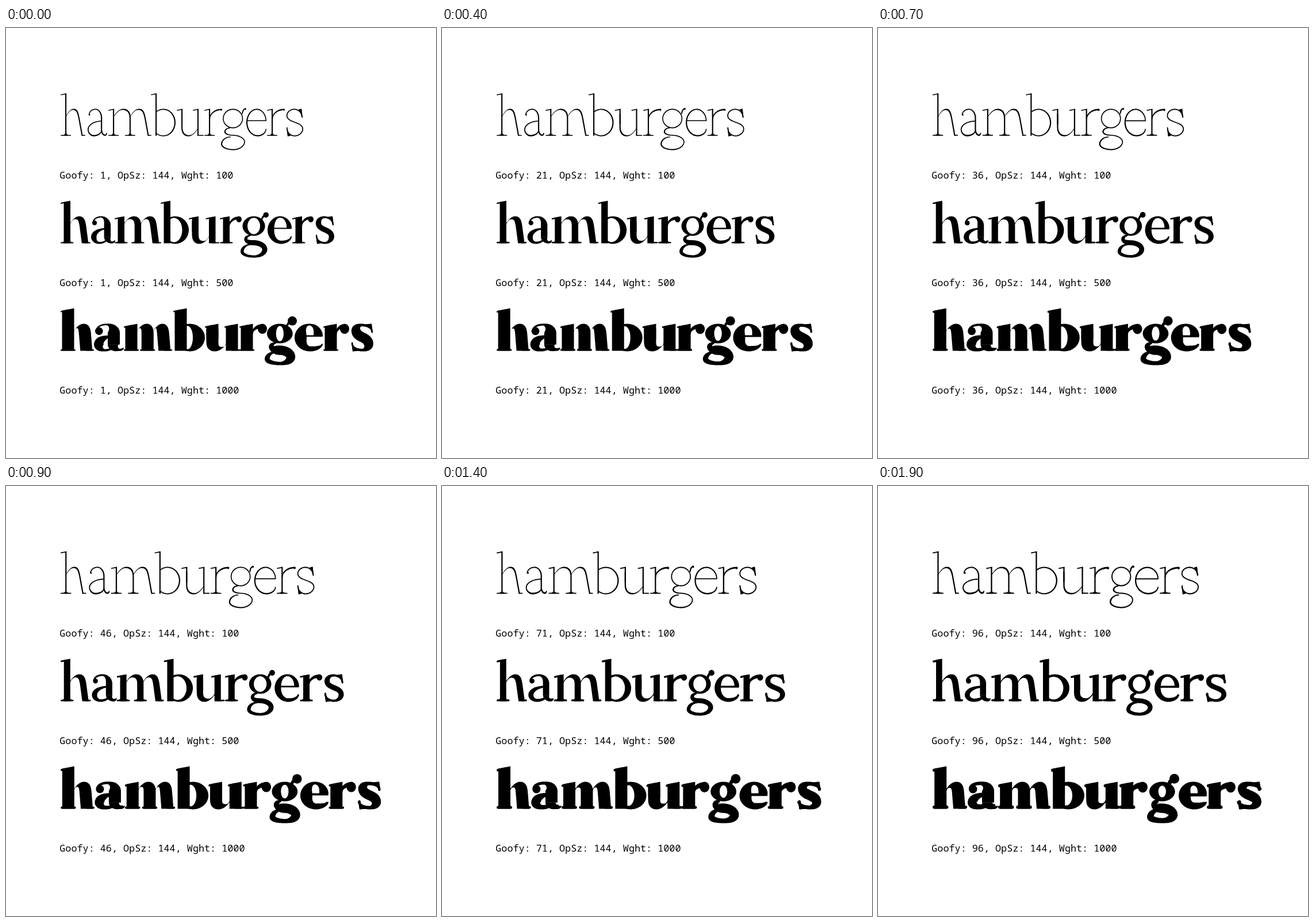
Write an HTML page with a canvas that moves like this. It is 748 px wide and 748 px high and loops after 2000 ms.

```html
<!DOCTYPE html>
<html lang="en">
<head>
<meta charset="utf-8">
<title>Variable type specimen</title>
<style>
  html, body { margin: 0; width: 100%; height: 100%; overflow: hidden; background: #fff; }
  canvas, svg { position: absolute; left: 0; top: 0; width: 748px; height: 748px; }
  text { font: 500 16.8px "Noto Sans Mono", "DejaVu Sans Mono", monospace; fill: #000; white-space: pre; }
</style>
</head>
<body>
<canvas role="img" aria-label="hamburgers"></canvas>
<svg viewBox="0 0 748 748"></svg>
<script>
const WORD = 'hamburgers', STEP = 100, STEPS = 20, ROW = 187;
const XH = -47, ASC = -74;

// Each pair holds the value at the low and the high end of the Goofy axis.
const ROWS = [
  { weight: 100, stem: [2.1, 2.3], hair: [1.5, 1.9], over: [8, 8.3], ball: [3, 4.2],
    left: [[95, 142, 178, 252, 297, 345, 374, 418, 454, 487], [95, 147, 188, 266, 314, 368, 403, 447, 490, 527]],
    width: [[43, 34, 75, 43, 47, 31, 44, 35, 31, 30], [46, 38, 78, 46, 52, 34, 43, 41, 35, 31]] },
  { weight: 500, stem: [11.5, 10.6], hair: [2.1, 3.6], over: [5.5, 6], ball: [9.5, 10.5],
    left: [[95, 148, 189, 269, 318, 372, 408, 455, 498, 538], [95, 151, 197, 281, 335, 391, 432, 481, 526, 570]],
    width: [[52, 42, 81, 49, 53, 38, 49, 42, 37, 33], [53, 45, 83, 52, 56, 41, 48, 43, 41, 36]] },
  { weight: 1000, stem: [21, 21], hair: [2.4, 5.5], over: [2.5, 3.2], ball: [16, 17],
    left: [[95, 153, 205, 291, 346, 406, 450, 502, 552, 600], [95, 156, 209, 301, 359, 420, 468, 523, 572, 625]],
    width: [[58, 52, 84, 55, 61, 48, 56, 49, 45, 39], [60, 53, 91, 58, 62, 49, 56, 49, 50, 42]] }
];

const canvas = document.querySelector('canvas');
const ctx = canvas.getContext('2d');
const dpr = window.devicePixelRatio || 1;
canvas.width = canvas.height = 748 * dpr;
ctx.lineCap = 'round';

const svg = document.querySelector('svg');
const labels = ROWS.map((row, i) => {
  const label = document.createElementNS(svg.namespaceURI, 'text');
  label.setAttribute('x', 93.3);
  label.setAttribute('y', 262 + i * ROW);
  return svg.appendChild(label);
});

let w, t, o, b;   // stem, hairline, serif overhang, ball size

const mix = (a, c, k) => a + (c - a) * k;

function shape(build, rule = 'nonzero') {
  ctx.beginPath();
  build();
  ctx.fill(rule);
}

function poly(...pts) {
  shape(() => pts.forEach(p => ctx.lineTo(...p)));
}

function bar(x1, y1, x2, y2, size = t) {
  ctx.lineWidth = size;
  ctx.beginPath();
  ctx.moveTo(x1, y1);
  ctx.lineTo(x2, y2);
  ctx.stroke();
}

function oval(x, y, rx, ry) {
  shape(() => ctx.ellipse(x, y, rx, ry, 0, 0, 7));
}

// Ring with thick sides and thin top and bottom.
function ring(x1, x2, y1, y2, inner1, inner2) {
  const cy = (y1 + y2) / 2, ry = (y2 - y1) / 2;
  shape(() => {
    ctx.ellipse((x1 + x2) / 2, cy, (x2 - x1) / 2, ry, 0, 0, 2 * Math.PI);
    ctx.closePath();
    ctx.moveTo(inner2, cy);
    ctx.ellipse((inner1 + inner2) / 2, cy, (inner2 - inner1) / 2, ry - t - .06 * w, 0, 0, 2 * Math.PI);
  }, 'evenodd');
}

// Swelling stroke through [x, y, width]; dirs gives each point's tangent.
function pen(dirs, ...pts) {
  const near = [], far = [];
  for (let i = 0; i < pts.length - 1; i++) {
    const [x0, y0, w0] = pts[i], [x3, y3, w3] = pts[i + 1];
    const dx = (x3 - x0) * .55, dy = (y3 - y0) * .55;
    const [x1, y1] = dirs[i] === 'h' ? [x0 + dx, y0] : [x0, y0 + dy];
    const [x2, y2] = dirs[i + 1] === 'h' ? [x3 - dx, y3] : [x3, y3 - dy];
    for (let n = 0; n <= 16; n++) {
      const s = n / 16, r = 1 - s;
      const at = (p, q, u, v) => r*r*r*p + 3*r*r*s*q + 3*r*s*s*u + s*s*s*v;
      const slope = (p, q, u, v) => r*r*(q - p) + 2*r*s*(u - q) + s*s*(v - u);
      const x = at(x0, x1, x2, x3), y = at(y0, y1, y2, y3);
      const vx = slope(x0, x1, x2, x3), vy = slope(y0, y1, y2, y3);
      const half = mix(w0, w3, s * s * (3 - 2 * s)) / 2 / (Math.hypot(vx, vy) || 1);
      near.push([x - vy * half, y + vx * half]);
      far.unshift([x + vy * half, y - vx * half]);
    }
  }
  poly(...near, ...far);
}

function turned(width, draw) {
  ctx.save();
  ctx.translate(width, XH + 1);
  ctx.scale(-1, -1);
  draw();
  ctx.restore();
}

// Upright with a slanted flag serif at its top left.
function stem(c, top, bottom = 0) {
  const l = c - w / 2, r = c + w / 2;
  const edge = x => top + .2 * (r - x);
  poly([l, edge(l)], [r, top], [r, bottom], [l, bottom]);
  const tip = l - o + t / 2, end = Math.max(c, tip);
  bar(tip, edge(tip) + t / 2, end, edge(end) + t / 2);
}

function foot(c) {
  const l = c - w / 2, r = c + w / 2, lift = t + o * .45;
  bar(l - o + t / 2, -t / 2, r + o - t / 2, -t / 2);
  for (const [x, end] of [[l, l - o * .7], [r, r + o * .7]])
    shape(() => {
      ctx.moveTo(x, -lift);
      ctx.quadraticCurveTo(x, -t, end, -t * .8);
      ctx.lineTo(x, -t * .8);
    });
}

const halfFoot = x => bar(x - w / 2, -t / 2, x + toe() - t / 2, -t / 2);
const toe = () => 2 + .3 * o;

// Arch out of a stem at sx into a leg whose right edge runs from xr to xb.
function arch(sx, xr, xb, bottom = 0) {
  const p = mix(sx, xr, .56), xl = xr - w, q = mix(sx, xl, .56);
  const inner = XH + t + .25 * w, lean = (xb - xr) / 3;
  shape(() => {
    ctx.moveTo(sx - 1, -34);
    ctx.bezierCurveTo(mix(sx, p, .3), -42, mix(sx, p, .6), XH, p, XH);
    ctx.bezierCurveTo(mix(p, xr, .65), XH, xr - lean, -41, xr, -31);
    ctx.lineTo(xb, bottom);
    ctx.lineTo(xb - w, bottom);
    ctx.lineTo(xl, -31);
    ctx.bezierCurveTo(xl - lean, -41 + t, mix(q, xl, .65), inner, q, inner);
    ctx.bezierCurveTo(mix(sx, q, .6), inner, mix(sx, q, .3), -42 + t, sx - 1, -34 + t);
  });
}

const first = () => o + w / 2;   // centre of a letter's first stem
const lean = () => mix(6, 2.5, w / 21);

const glyphs = {
  h(W) {
    const c = first(), xb = W - toe();
    stem(c, ASC);
    foot(c);
    arch(c + w / 2, xb - lean(), xb);
    halfFoot(xb);
  },
  m(W) {
    const c = first(), xb = W - toe(), xr = xb - lean();
    const mid = (c + (xr + xb - w) / 2) / 2;
    stem(c, XH);
    foot(c);
    arch(c + w / 2, mid + w / 2, mid + w / 2);
    foot(mid);
    arch(mid + w / 2, xr, xb);
    halfFoot(xb);
  },
  u(W) {
    const l = first(), r = W - o - 1 - w / 2;
    stem(l, XH, -20);
    stem(r, XH);
    turned(W, () => arch(W - r + w / 2, W - l + w / 2, W - l + w / 2, -8));
    bar(r, -t / 2, W - t / 2, -t / 2);
  },
  r(W) {
    const c = first(), sx = c + w / 2, cx = W - b / 2;
    stem(c, XH);
    foot(c);
    pen('vh', [sx - t / 2, -29, t], [cx, XH + t / 2 + b * .18, t + b * .3]);
    oval(cx, XH + b * .55, b / 2, b * .55);
  },
  b(W) {
    const c = first(), l = c - .25 * (W - c);
    stem(c, ASC);
    ctx.save();
    ctx.beginPath();
    ctx.rect(c, -60, W, 70);
    ctx.clip();
    ring(l, W, XH, 1, l + Math.max(t, .6 * w), W - w);
    ctx.restore();
  },
  a(W) {
    const sx = W - mix(9, 7, w / 21) - w / 2, ball = .85 * b, ballX = 2 + ball / 2;
    const side = Math.max(t, .82 * w);
    oval(ballX, -37 + ball * .2, ball / 2, ball / 2);
    pen('vhvv', [ballX - ball * .3, -36, t], [mix(ballX, sx, .5), XH + t / 2, t * 1.1],
      [sx, -31, w], [sx, -11, w]);
    pen('vhv', [sx, -11.2, w], [mix(sx, W, .6), -t * .7, t * 1.6], [W - t / 2, -5, t]);
    pen('hvhv', [sx, -25.5, t], [side / 2, -11, side], [mix(side / 2, sx, .42), 1 - t * .8, t * 1.6], [sx, -10, t]);
  },
  e(W) {
    const side = .76 * w, low = t + .3 * w;
    pen('vhvhv', [W - side / 2, -26, Math.max(t, side)], [W * .52, XH + t * .6, t * 1.2],
      [w / 2, -23, w], [W * .56, 1 - low / 2, low], [W - t / 2, -12, t]);
    poly([w / 2, -27], [W - .3, -27], [W - .3, -27 + t], [w / 2, -27 + t]);
  },
  g(W) {
    const l = .07 * W, r = .87 * W, side = Math.max(t, .75 * w), band = Math.max(t, .78 * w);
    ring(l, r, XH, -13, l + side, r - side);
    pen('vh', [r - side * .7, -38, t * 1.2], [W - b / 2, XH + 1 - b * .3, t + b * .15]);
    oval(W - b / 2, -45.5 - .4 * b, b / 2, b / 2);
    const loop = t + .16 * w, edge = t + .3 * w;
    pen('hvhvhvh', [.36 * W, -13.6, t], [.13 * W + edge / 2, -7, edge], [.45 * W, -1, band],
      [.95 * W - band / 2, 10.5, band], [.48 * W, 25 - loop / 2, loop],
      [edge / 2, 14.5, edge], [.38 * W, 2, t]);
  },
  s(W) {
    const side = Math.max(t, .82 * w), low = t + .1 * w, span = 4 + .45 * w;
    pen('vhvvhv', [W - 2.5, -33, t], [W * .48, XH + low / 2, low], [side / 2 + .8, -35, side],
      [W - side / 2, -12, side], [W * .5, 1 - low / 2, low], [2, -13, t]);
    const wedge = () => {
      shape(() => {
        ctx.moveTo(W - 3 - span, XH + 1);
        ctx.lineTo(W - 3, XH);
        ctx.lineTo(W - 1, -31);
        ctx.quadraticCurveTo(W - 4, -43, W - 3 - span, XH + 1 + t);
      });
      bar(W - 3 - t / 2, XH + t / 2, W - 1 - t / 2, -31 - t / 2);
    };
    wedge();
    turned(W, wedge);
  }
};

function draw(step) {
  const goofy = 1 + step * 5, k = step / (STEPS - 1);
  ctx.setTransform(dpr, 0, 0, dpr, 0, 0);
  ctx.fillStyle = '#fff';
  ctx.fillRect(0, 0, 748, 748);
  ctx.fillStyle = ctx.strokeStyle = '#000';
  ROWS.forEach((row, i) => {
    [w, t, o, b] = [row.stem, row.hair, row.over, row.ball].map(([lo, hi]) => mix(lo, hi, k));
    [...WORD].forEach((char, n) => {
      const at = ([lo, hi]) => mix(lo[n], hi[n], k);
      ctx.save();
      ctx.translate(at(row.left), ROW * (i + 1) + .5);
      glyphs[char](at(row.width));
      ctx.restore();
    });
    labels[i].textContent = `Goofy: ${goofy}, OpSz: 144, Wght: ${row.weight}`;
  });
}

let shown = 0;
function tick(now) {
  const step = Math.floor(now / STEP) % STEPS;
  if (step !== shown) draw(shown = step);
  requestAnimationFrame(tick);
}
draw(0);
requestAnimationFrame(tick);
</script>
</body>
</html>
```
